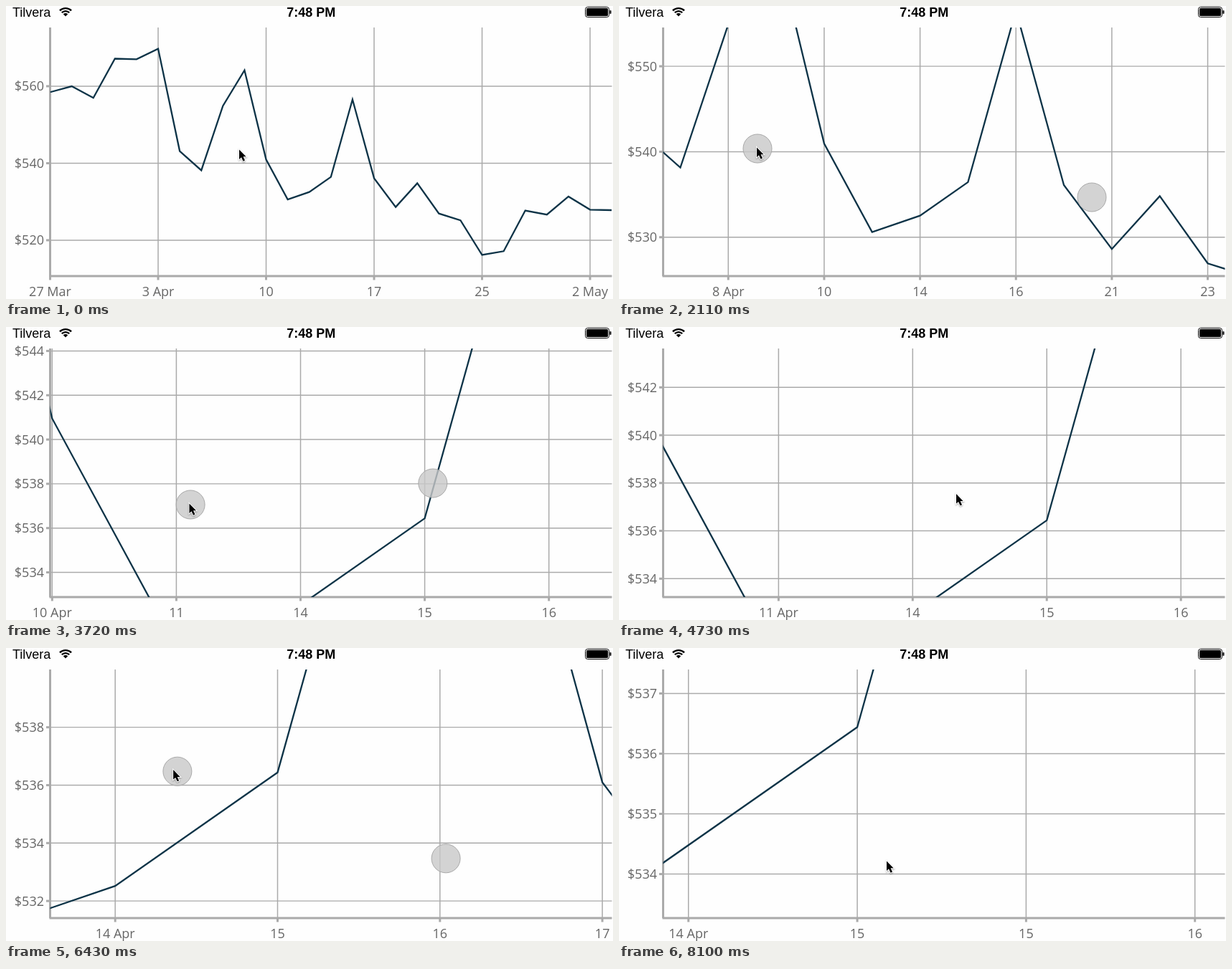
Animation, 846 px wide and 409 px high, one loop 8.24 s. Source, as an HTML page with a canvas:

```html
<!DOCTYPE html>
<html lang="en">
<head>
<meta charset="utf-8">
<title>Pinch and pan on a price chart</title>
<style>
  html, body { margin: 0; width: 100%; height: 100%; overflow: hidden; background: #fefefe; }
  canvas { display: block; }
</style>
</head>
<body>
<canvas id="stage" width="846" height="409"></canvas>
<script>
const ctx = document.getElementById('stage').getContext('2d');
const LOOP = 8240;
const LEFT = 61.5, RIGHT = 844.5, TOP = 30, BOTTOM = 377;
const GREY = '#aaa';
const LABEL_FONT = '18px "Open Sans", "Noto Sans", sans-serif';
const STATUS_FONT = '18px "Liberation Sans", Arial, sans-serif';

const prices = [558.46, 559.99, 556.97, 567.16, 567, 569.74, 543.14, 538.15, 554.9,
  564.14, 540.95, 530.6, 532.52, 536.44, 556.54, 536.1, 528.62, 534.81, 526.94,
  525.16, 516.18, 517.15, 527.7, 526.66, 531.35, 527.93, 527.81];
const days = [27, 28, 31, 1, 2, 3, 4, 7, 8, 9, 10, 11, 14, 15, 16, 17, 21, 22, 23,
  24, 25, 28, 29, 30, 1, 2, 5];
const monthOf = i => i < 3 ? 'Mar' : i < 24 ? 'Apr' : 'May';

// Keys: time, then values
const zoomKeys = [[970, 1], [1350, 1.24], [1480, 1.24], [1520, 1.275], [2110, 2.22],
  [3000, 2.22], [3190, 2.908], [3810, 5.9], [3980, 5.9], [4070, 6.21], [6150, 6.21],
  [6940, 13.6], [7030, 14.08], [7260, 15.635]].map(([t, z]) => [t, Math.log(z)]);
const panKeys = [[4730, 0], [4900, .38], [5150, .88], [5420, 1]];
const handKeys = [[970, 326, 202], [1350, 269, 202], [1480, 269, 202], [1520, 266, 202],
  [2110, 193, 199], [2240, 193, 199], [2790, 367, 243], [3000, 367, 243],
  [3190, 322, 246.5], [3810, 255, 248], [4200, 255, 248], [4500, 472, 235],
  [4730, 472, 235], [4900, 410, 209], [5150, 290, 160], [5700, 290, 160],
  [6030, 290, 178], [6150, 290, 178], [6940, 95, 152], [7030, 90.5, 150],
  [7045, 86.5, 147.5], [7260, 74, 140], [7580, 74, 140], [8100, 374, 299]];

// Monotone cubic interpolation through the keys
function at(keys, t) {
  const last = keys.length - 1;
  if (t <= keys[0][0]) return keys[0].slice(1);
  if (t >= keys[last][0]) return keys[last].slice(1);
  const i = keys.findIndex(k => k[0] > t) - 1;
  const span = keys[i + 1][0] - keys[i][0], u = (t - keys[i][0]) / span;
  return keys[i].slice(1).map((a, n) => {
    const j = n + 1, b = keys[i + 1][j];
    const slope = k => k < 0 || k >= last ? 0
      : (keys[k + 1][j] - keys[k][j]) / (keys[k + 1][0] - keys[k][0]);
    const tangent = k => {
      const p = slope(k - 1), q = slope(k);
      return p * q > 0 ? 2 * p * q / (p + q) : 0;
    };
    const v = 1 - u;
    return a * v * v * (1 + 2 * u) + b * u * u * (3 - 2 * u)
      + span * u * v * (tangent(i) * v - tangent(i + 1) * u);
  });
}

function stroke(points, color, width) {
  ctx.beginPath();
  points.forEach(([x, y]) => ctx.lineTo(x, y));
  ctx.strokeStyle = color;
  ctx.lineWidth = width;
  ctx.stroke();
}

function text(str, x, y, align, color, font) {
  ctx.font = font;
  ctx.fillStyle = color;
  ctx.textAlign = align;
  ctx.fillText(str, x, y);
}

// Multiples of the smallest step that keeps ticks far enough apart
function ticks(steps, scale, gap, from, to) {
  const step = steps.find(s => s * scale >= gap);
  const list = [];
  for (let n = Math.ceil(from / step); n * step <= to; n++) list.push(n * step);
  return list;
}

function drawChart(t) {
  const zoom = Math.exp(at(zoomKeys, t)[0]), [pan] = at(panKeys, t);
  const mix = (a, b) => a + (b - a) * pan;
  const sx = 30.1 * zoom, sy = 5.375 * zoom;
  const ax = mix(425.3, 421.5), ai = mix(12.0855, 13.19);
  const ay = mix(232.6, 232.2), ap = mix(537.556, 534.992);
  const toX = i => ax + (i - ai) * sx, toY = p => ay + (ap - p) * sy;

  let month = '';
  const firstIndex = Math.max(0, ai + (LEFT - .5 - ax) / sx);
  const lastIndex = Math.min(26, ai + (RIGHT - ax) / sx);
  for (const i of ticks([.5, 1, 2, 5], sx, 120, firstIndex, lastIndex)) {
    const x = toX(i), k = Math.floor(i), m = monthOf(k);
    stroke([[x, TOP], [x, BOTTOM]], GREY, 1.5);
    stroke([[x, BOTTOM], [x, 382.5]], GREY, 3);
    text(days[k] + (m === month ? '' : ' ' + m), x, 405, 'center', '#666', LABEL_FONT);
    month = m;
  }
  const low = ap - (BOTTOM - ay) / sy, high = ap + (ay - TOP) / sy;
  for (const p of ticks([1, 2, 5, 10, 20], sy, 60, low, high)) {
    const y = toY(p);
    stroke([[LEFT, y], [RIGHT, y]], GREY, 1.4);
    stroke([[56, y], [LEFT, y]], GREY, 3);
    text('$' + p, 53, y + 6.5, 'right', '#666', LABEL_FONT);
  }

  stroke([[LEFT, TOP], [LEFT, BOTTOM]], GREY, 3);
  stroke([[LEFT - 1, BOTTOM], [RIGHT, BOTTOM]], GREY, 3);

  ctx.save();
  ctx.beginPath();
  ctx.rect(LEFT, TOP, RIGHT - LEFT, BOTTOM - TOP);
  ctx.clip();
  stroke(prices.map((p, i) => [toX(i), toY(p)]), '#0d3347', 2.3);
  ctx.restore();
}

function drawStatus() {
  text('Tilvera', 9, 15, 'left', '#000', STATUS_FONT);
  text('7:48 PM', 425.3, 15, 'center', '#000', 'bold ' + STATUS_FONT);

  ctx.strokeStyle = ctx.fillStyle = '#000';
  ctx.lineWidth = 2.4;
  const a = Math.PI * 1.25, b = Math.PI * 1.75;
  for (const r of [11.4, 7.4]) {
    ctx.beginPath();
    ctx.arc(83, 14.5, r, a, b);
    ctx.stroke();
  }
  ctx.beginPath();
  ctx.moveTo(83, 14.5);
  ctx.arc(83, 14.5, 4.6, a, b);
  ctx.fill();

  ctx.lineWidth = 1;
  ctx.beginPath();
  ctx.roundRect(807.5, 1.5, 33, 14, 3);
  ctx.stroke();
  ctx.beginPath();
  ctx.roundRect(809, 3, 30, 11, 1.5);
  ctx.fill();
  ctx.beginPath();
  ctx.roundRect(841.5, 6, 2, 5, 1);
  ctx.fill();
}

function drawTouch(x, y) {
  ctx.beginPath();
  ctx.arc(x, y, 20, 0, 2 * Math.PI);
  ctx.fillStyle = 'rgba(200,200,200,.8)';
  ctx.fill();
  ctx.strokeStyle = '#a8a8a8';
  ctx.lineWidth = 1;
  ctx.stroke();
}

const arrow = new Path2D('M0 0V13.5L3 10.8 5.6 16.2 8 15.1 5.6 9.8H9.6Z');
function drawCursor(x, y) {
  ctx.save();
  ctx.translate(x - 1, y - 1.5);
  ctx.shadowColor = 'rgba(0,0,0,.35)';
  ctx.shadowBlur = 2;
  ctx.shadowOffsetY = 1;
  ctx.strokeStyle = '#fff';
  ctx.lineWidth = 2;
  ctx.stroke(arrow);
  ctx.shadowColor = 'transparent';
  ctx.fillStyle = '#000';
  ctx.fill(arrow);
  ctx.restore();
}

function draw(now) {
  const t = now % LOOP;
  ctx.fillStyle = '#fefefe';
  ctx.fillRect(0, 0, 846, 409);
  drawStatus();
  drawChart(t);
  const [x, y] = at(handKeys, t);
  if ((t >= 970 && t < 4220) || (t >= 6000 && t < 7600)) {
    drawTouch(x, y);
    drawTouch(852 - x, 466 - y);
  }
  // The pointer runs slightly ahead of the touch marks
  drawCursor(...at(handKeys, t + 15));
}

const start = performance.now();
function frame() {
  draw(performance.now() - start);
  requestAnimationFrame(frame);
}
frame();
</script>
</body>
</html>
```
